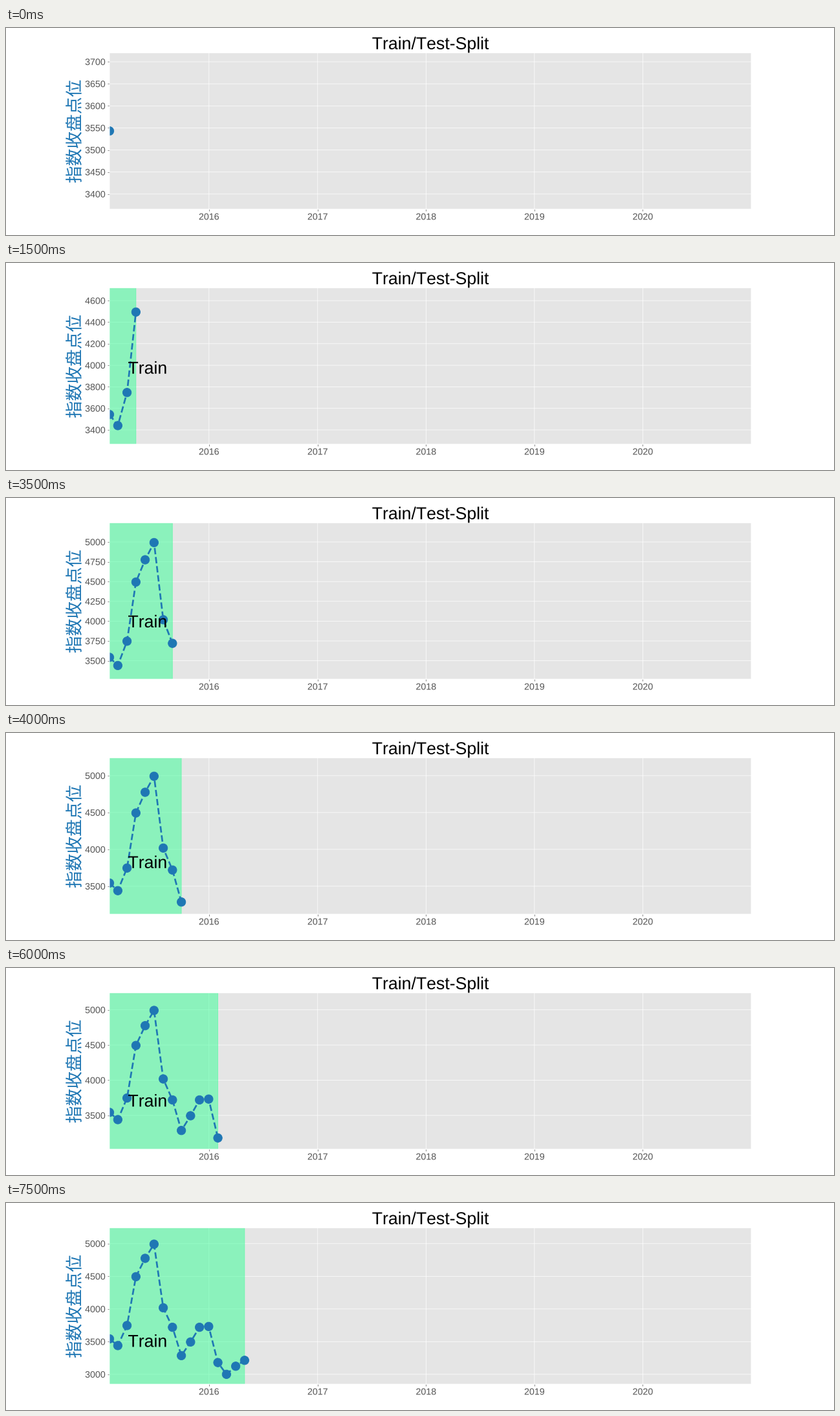
Write a matplotlib script that moves like this. It is 1280 px wide and 320 px high and loops after 8000 ms.

```python
import numpy as np
import matplotlib.pyplot as plt
from matplotlib.animation import FuncAnimation
from matplotlib.patches import Rectangle
from matplotlib.patheffects import Normal
from matplotlib.ticker import MaxNLocator

W, H, DPI = 1280, 320, 64
BLUE, GREEN, GREY = "#1f77b4", "#33ff94", "#555555"

# No snapping, and text and markers drawn as paths, for subpixel placement
plt.rcParams.update({
    "font.family": ["Liberation Sans"],
    "text.kerning_factor": 6,
    "text.hinting": "no_hinting",
    "path.snap": False,
    "path.effects": [Normal()],
    "axes.axisbelow": True,
    "axes.facecolor": "#e5e5e5",
    "axes.edgecolor": "white",
    "axes.linewidth": 1,
})

# Month-end closing levels from January 2015
close = np.array([3543, 3440, 3747, 4494, 4775, 4992, 4018, 3720,
                  3286, 3495, 3720, 3732, 3180, 3000, 3124, 3214])
start = np.datetime64("2015-01-31")


def days(dates):
    return (dates.astype("datetime64[D]") - start).astype(int)


x = days(np.datetime64("2015-02") + np.arange(len(close))) - 1
years = np.arange("2016", "2021", dtype="datetime64[Y]")
last = days(np.datetime64("2020-12-31"))

fig = plt.figure(figsize=(W / DPI, H / DPI), dpi=DPI, facecolor="white")
ax = fig.add_axes([0.125, 0.125, 0.775, 0.755])
ax.set_xlim(0, last)
ax.set_xticks(days(years), years.astype(str))
ax.yaxis.set_major_locator(MaxNLocator(nbins=8, steps=[1, 2, 2.5, 5, 10]))
ax.tick_params(color=GREY, labelcolor=GREY, labelsize=16)
ax.grid(color="white", lw=0.8)
ax.set_title("Train/Test-Split", fontsize=30)
fig.text(114.6 / W, 1 - 160 / H, "指数收盘点位", fontsize=30, color=BLUE,
         family="Noto Sans CJK JP", rotation=90, rotation_mode="anchor",
         ha="center", va="baseline")

span = ax.add_patch(Rectangle((0, 0), 0, 1, color=GREEN, alpha=0.5, lw=1,
                              transform=ax.get_xaxis_transform()))
line, = ax.plot([], [], "o--", color=BLUE, lw=3, ms=15)
label = ax.text(62, 0, "Train", fontsize=30)


def update(i):
    seen = close[:i + 1]
    low, high = seen.min() * 0.95, seen.max() * 1.05
    ax.set_ylim(low, high)
    line.set_data(x[:i + 1], seen)
    span.set_width(x[i])
    span.set_visible(i > 0)
    label.set_y(low * 1.2)
    return line, span, label


anim = FuncAnimation(fig, update, frames=len(close), interval=500,
                     repeat=True, repeat_delay=0, blit=False)
plt.show()
```
